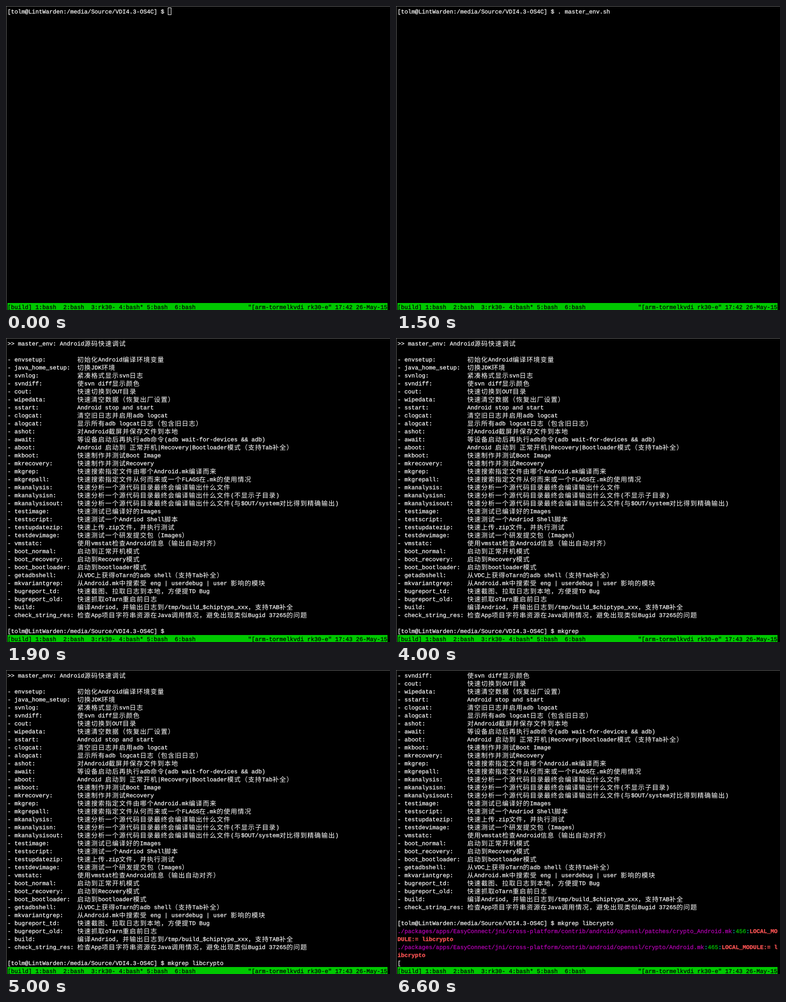
Animation, 771 px wide and 609 px high, one loop 8 s. Source, as an HTML page:

```html
<!DOCTYPE html>
<html lang="zh-CN">
<head>
<meta charset="utf-8">
<title>Terminal</title>
<style>
html, body { margin: 0; width: 100%; height: 100%; overflow: hidden; background: #000; }
svg { display: block; width: 771px; height: 609px; }
text {
  font: 11.667px "Liberation Mono", monospace;
  white-space: pre;
  text-rendering: geometricPrecision;
  stroke-width: .25px;
}
.wide { font: 13px "Noto Sans CJK SC", "Noto Sans CJK", sans-serif; letter-spacing: 1px; }
</style>
</head>
<body>
<svg viewBox="0 0 771 609">
  <rect width="771" height="609" fill="#000"/>
  <path d="M0 .5H771M.5 0V609" stroke="#696969"/>
  <g id="rows"></g>
  <rect id="cursor" x="325.5" y="3.5" width="6" height="14" fill="none" stroke="#fff"/>
  <rect x="3" y="595" width="763" height="14" fill="#00c800"/>
  <g id="status"></g>
</svg>
<script>
const LOOP = 8000, CELL = 7, ROW = 16, LEFT = 3, TOP = 3, BASE = 12, WIDE_BASE = 13, LAST_ROW = 36;
const WHITE = '#fff', PURPLE = '#bb00bb', CYAN = '#00bbbb', GREEN = '#00c800', RED = '#ff5555';
const PROMPT = '[tolm@LintWarden:/media/Source/VDI4.3-OS4C] $ ';

const help = `envsetup: 初始化Android编译环境变量
java_home_setup: 切换JDK环境
svnlog: 紧凑格式显示svn日志
svndiff: 使svn diff显示颜色
cout: 快速切换到OUT目录
wipedata: 快速清空数据（恢复出厂设置）
sstart: Android stop and start
clogcat: 清空旧日志并启用adb logcat
alogcat: 显示所有adb logcat日志（包含旧日志）
ashot: 对Android截屏并保存文件到本地
await: 等设备启动后再执行adb命令(adb wait-for-devices && adb)
aboot: Android 启动到 正常开机|Recovery|Bootloader模式（支持Tab补全）
mkboot: 快速制作并测试Boot Image
mkrecovery: 快速制作并测试Recovery
mkgrep: 快速搜索指定文件由哪个Android.mk编译而来
mkgrepall: 快速搜索指定文件从何而来或一个FLAGS在.mk的使用情况
mkanalysis: 快速分析一个源代码目录最终会编译输出什么文件
mkanalysisn: 快速分析一个源代码目录最终会编译输出什么文件(不显示子目录)
mkanalysisout: 快速分析一个源代码目录最终会编译输出什么文件(与$OUT/system对比得到精确输出)
testimage: 快速测试已编译好的Images
testscript: 快速测试一个Andriod Shell脚本
testupdatezip: 快速上传.zip文件，并执行测试
testdevimage: 快速测试一个研发提交包（Images）
vmstatc: 使用vmstat检查Android信息（输出自动对齐）
boot_normal: 启动到正常开机模式
boot_recovery: 启动到Recovery模式
boot_bootloader: 启动到bootloader模式
getadbshell: 从VDC上获得oTarn的adb shell（支持Tab补全）
mkvariantgrep: 从Android.mk中搜索受 eng | userdebug | user 影响的模块
bugreport_td: 快速截图、拉取日志到本地，方便提TD Bug
bugreport_old: 快速抓取oTarn重启前日志
build: 编译Andriod，并输出日志到/tmp/build_$chiptype_xxx，支持TAB补全
check_string_res: 检查App项目字符串资源在Java调用情况，避免出现类似Bugid 37265的问题`
  .split('\n').map(line => {
    const cut = line.indexOf(' ');
    return '- ' + line.slice(0, cut).padEnd(18) + line.slice(cut + 1);
  });
const intro = ['>> master_env: Android源码快速调试', '', ...help, ''];

const openssl = './packages/apps/EasyConnect/jni/cross-platform/contrib/android/openssl/';
const hit = (file, line, text) =>
  [[PURPLE, openssl + file], [CYAN, ':'], [GREEN, line], [CYAN, ':'], [RED, text]];
const hits = [
  hit('patches/crypto_Android.mk', '456', 'LOCAL_MO'),
  [[RED, 'DULE:= libcrypto']],
  hit('crypto/Android.mk', '465', 'LOCAL_MODULE:= l'),
  [[RED, 'ibcrypto']]
];

// Each step: start time, screen lines
const steps = [];
const at = (time, lines) => steps.push({ time, lines });
const type = (before, entries) =>
  entries.forEach(([time, text]) => at(time, [...before, PROMPT + text]));

type([], [[0, ''], [200, '. '], [1300, '. m'], [1400, '. mas'], [1500, '. master_env.sh']]);
type(intro, [[1900, ''], [3600, 'm'], [3700, 'mk'], [3800, 'mkg'], [3900, 'mkgr'],
  [4000, 'mkgrep'], [5000, 'mkgrep libcrypto']]);
const ran = [...intro, PROMPT + 'mkgrep libcrypto'];
at(6500, [...ran, '[']);
at(6600, [...ran, ...hits, '[']);

const rows = document.getElementById('rows');
const cursor = document.getElementById('cursor');
const status = document.getElementById('status');

function make(tag, attrs) {
  const el = document.createElementNS('http://www.w3.org/2000/svg', tag);
  for (const key in attrs) el.setAttribute(key, attrs[key]);
  return el;
}

// Latin characters take one cell, CJK characters two
function drawLine(parent, row, segments, col = 0) {
  const text = make('text', {});
  for (const [color, str] of segments) {
    for (const run of str.match(/[\u2e80-\uffef]+|[^\u2e80-\uffef]+/g) || []) {
      const wide = run.charCodeAt(0) >= 0x2e80;
      const span = make('tspan', {
        x: LEFT + col * CELL,
        y: TOP + row * ROW + (wide ? WIDE_BASE : BASE),
        fill: color,
        stroke: wide ? 'none' : color,
        'font-weight': color === RED ? 700 : 400
      });
      if (wide) span.setAttribute('class', 'wide');
      span.textContent = run;
      text.append(span);
      col += run.length * (wide ? 2 : 1);
    }
  }
  parent.append(text);
}

function drawStep({ time, lines }) {
  rows.replaceChildren();
  status.replaceChildren();
  const scroll = Math.max(0, lines.length - 1 - LAST_ROW);
  lines.slice(scroll).forEach((line, i) =>
    drawLine(rows, i, typeof line === 'string' ? [[WHITE, line]] : line));
  cursor.setAttribute('visibility', time === 0 ? 'visible' : 'hidden');
  const clock = time < 1900 ? '17:42' : '17:43';
  drawLine(status, 37, [['#000', '[build] 1:bash  2:bash  3:rk30- 4:bash* 5:bash  6:bash']]);
  drawLine(status, 37, [['#000', `"[arm-tormelkvdi rk30-e" ${clock} 26-May-15`]], 69);
}

let shown;
function render(t) {
  const step = steps.findLast(s => s.time <= t);
  if (step !== shown) drawStep(shown = step);
}

const start = performance.now();
function tick() {
  render((performance.now() - start) % LOOP);
  requestAnimationFrame(tick);
}
tick();
</script>
</body>
</html>
```
